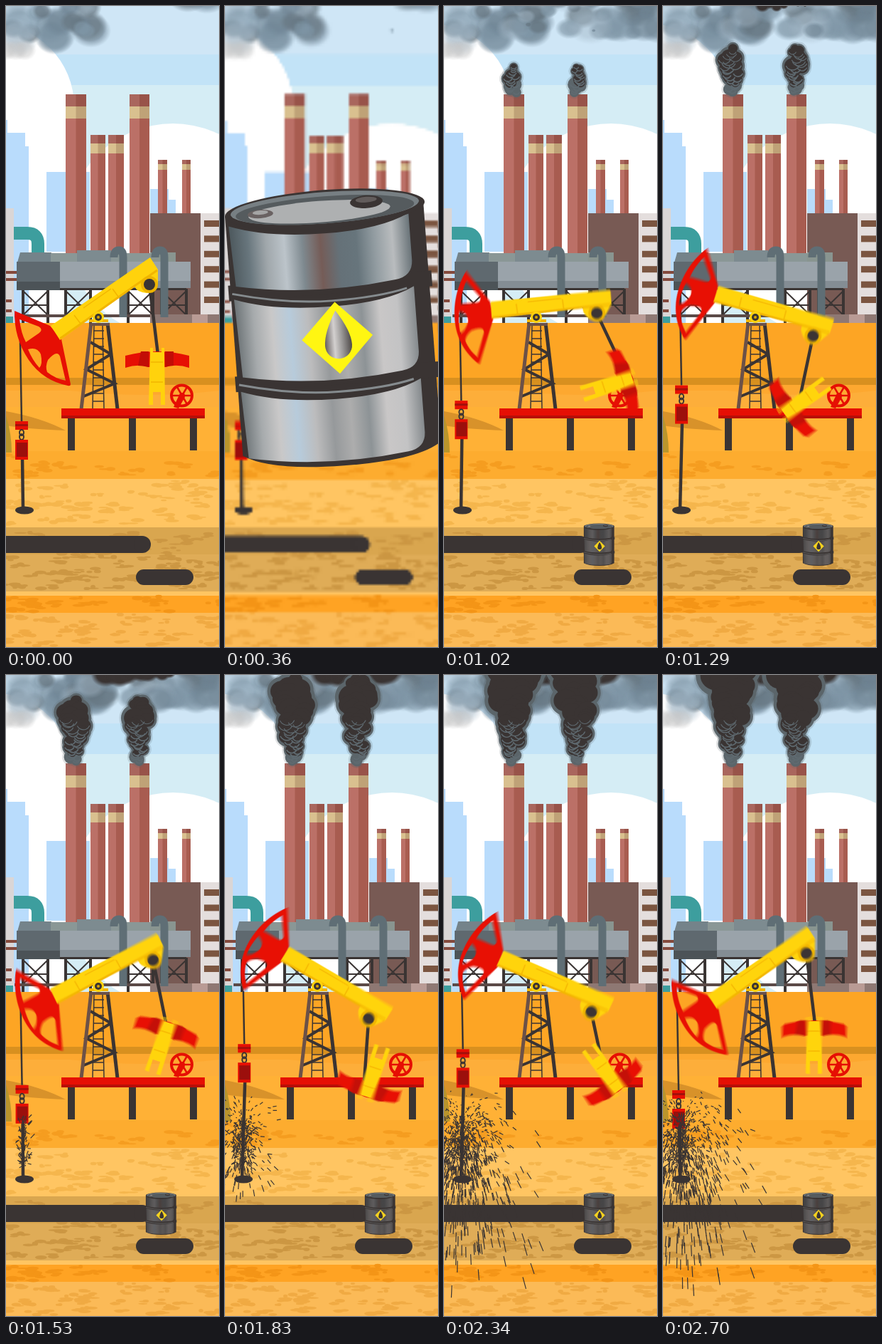
An HTML page with a canvas that plays this animation: 300 by 900 pixels, repeating every 2730 ms.

```html
<!DOCTYPE html>
<html lang="en">
<head>
<meta charset="utf-8">
<title>Oil field</title>
<style>
html, body { margin: 0; width: 100%; height: 100%; overflow: hidden; }
canvas { display: block; }
</style>
</head>
<body>
<canvas id="stage" width="300" height="900"></canvas>
<script>
const W = 300, H = 900, LOOP = 2730, STEP = 30, START = 900;
const DARK = '#3a3433', RED = '#e60f04', YELLOW = '#ffd20c', TAU = Math.PI * 2;
const context = c => c.getContext('2d', { willReadFrequently: true });
const stage = context(document.getElementById('stage'));
let g = stage;

const clamp = v => Math.max(0, Math.min(1, v));
const mix = (a, b, k) => a + (b - a) * k;
const ease = k => k * k * (3 - 2 * k);
const random = seed => () => {
  seed = seed + 0x6D2B79F5 | 0;
  let n = Math.imul(seed ^ seed >>> 15, 1 | seed);
  n = n + Math.imul(n ^ n >>> 7, 61 | n) ^ n;
  return ((n ^ n >>> 14) >>> 0) / 4294967296;
};

function rect(color, x, y, w, h) { g.fillStyle = color; g.fillRect(x, y, w, h); }
function shape(color, d, rule = 'nonzero') { g.fillStyle = color; g.fill(new Path2D(d), rule); }
function line(color, width, d) { g.strokeStyle = color; g.lineWidth = width; g.stroke(new Path2D(d)); }
function oval(color, x, y, rx, ry = rx) {
  g.fillStyle = color;
  g.beginPath();
  g.ellipse(x, y, rx, ry, 0, 0, TAU);
  g.fill();
}
function layer(w, h, draw) {
  const c = document.createElement('canvas');
  c.width = w; c.height = h;
  const previous = g;
  g = context(c);
  if (draw) draw();
  g = previous;
  return c;
}

function chimney(x, y, w, bottom, bandY, bandH) {
  rect('#bb7067', x, y, w, bottom - y);
  rect('#a85c50', x + w / 2, y, w / 2, bottom - y);
  rect('#d9c08f', x, bandY, w, bandH);
  rect('#bfa277', x + w / 2, bandY, w / 2, bandH);
  rect('#00000018', x, y, w, bandY - y);
}

function sky() {
  rect('#cfe6f6', 0, 0, W, 68);
  rect('#c2e3f7', 0, 68, W, 43);
  rect('#d5edf5', 0, 111, W, 340);
  oval('#fff', -20, 141, 116);
  rect('#fff', 0, 140, 84, 310);
  oval('#fff', 235, 315, 150);
  shape('#b9dcfc', 'M0 160V445H32V197H27V178H2V160ZM57 233H118V345H57ZM203 257H229V272H239V345H203Z');
}

function factory() {
  chimney(214, 216, 13, 292, 222, 8);
  chimney(248, 216, 12, 292, 222, 8);
  rect('#785a54', 203, 291, 71, 154);
  rect('#e4dedd', 274, 291, 26, 142);
  for (let y = 301; y < 420; y += 21.4) rect('#7b5540', 279, y, 21, 9);
  rect('#dad6d6', 0, 284, 11, 161);
  for (const y of [372, 382, 412, 426]) rect('#84493c', 0, y, y < 400 ? 16 : 8, 4);
  line('#3d9e9e', 18, 'M11 319H30Q45 319 45 334V347');
  rect('#3d9e9e', 0, 436, 10, 9);
  chimney(84, 124, 29, 347, 141, 17);
  chimney(119, 181, 21, 347, 193, 14);
  chimney(144, 181, 22, 347, 193, 14);
  chimney(174, 124, 28, 347, 141, 17);
  for (const x of [24, 84, 172, 219]) {
    line(DARK, 4, `M${x} 397V445M${x + 35} 397V445`);
    line(DARK, 2, `M${x} 400L${x + 35} 434M${x + 35} 400L${x} 434M${x} 420H${x + 35}`);
  }
  rect('#5b4a47', 12, 433, 191, 4);
  rect('#8e7873', 203, 433, 97, 12);
  rect('#b99b95', 262, 433, 22, 12);
  shape('#74838a', 'M20 346H64V360H16Z');
  rect('#8a9796', 63, 347, 142, 12);
  rect('#7d8b90', 100, 343, 48, 16);
  rect('#899590', 203, 346, 36, 13);
  rect('#5f696f', 15, 359, 62, 28);
  rect('#9aa3aa', 76, 359, 184, 37);
  rect('#848d94', 76, 386, 184, 10);
  rect('#4c5357', 15, 387, 61, 12);
  rect(DARK, 76, 396, 178, 3);
  line('#5f6e75', 11, 'M152 353Q152 343 159 343Q165 343 165 353V437M210 353Q210 343 217 343Q223 343 223 353V437');
}

function ground() {
  const bands = [[445, '#fda524'], [522, '#d8901f'], [532, '#fda830'], [563, '#ffb136'], [625, '#fdac2f'],
    [664, '#ffc562'], [732, '#d9a64f'], [770, '#dfac57'], [822, '#ffc562'], [828, '#ffa323'], [852, '#fbba57']];
  for (const [y, color] of bands) rect(color, 0, y, W, H - y);
  shape('#fdae3a', 'M0 540H90Q200 552 300 540V563H0Z');
  shape('#d8922a', 'M0 569Q50 578 84 596Q30 594 0 589Z');
  const rnd = random(7);
  const soils = [[630, 32, '#f59d20', 18], [668, 60, '#f5b64d', 55], [738, 80, '#cc9743', 80],
    [830, 20, '#f49517', 22], [856, 44, '#f0aa43', 45]];
  for (const [top, height, color, count] of soils)
    for (let i = 0; i < count; i++) {
      const x = rnd() * W, y = top + rnd() * height;
      for (let j = 0; j < 3; j++)
        oval(color, x + (rnd() - .5) * 20, Math.min(y + (rnd() - .5) * 6, top + height), 3 + rnd() * 7, 1 + rnd() * 2);
    }
  shape('#b9952c', 'M0 575Q8 600 8 627H0Z');
  line(DARK, 24, 'M0 756H192');
  oval(DARK, 192, 756, 12);
  shape(DARK, 'M194 791H253A11 11 0 0 1 253 813H194A11 11 0 0 1 194 791Z');
}

function rig() {
  line(DARK, 1.5, 'M124 446L122 566M136 446L138 566');
  for (let y = 456; y < 566; y += 11) line(DARK, 1.5, `M123 ${y}H138`);
  line(DARK, 4, 'M119 472L148 489M146 490L113 510L153 530L107 549');
  line('#6c5147', 5, 'M120 445L106 566');
  line(DARK, 5, 'M143 445L157 566');
  rect('#6c5147', 117, 445, 29, 4);
  for (const x of [87, 173, 259]) rect(DARK, x, 578, 10, 46);
  rect(RED, 78, 565, 202, 14);
  rect('#b80e08', 78, 575, 202, 4);
  line(RED, 4, 'M262 547A14.5 14.5 0 1 1 233 547A14.5 14.5 0 1 1 262 547');
  line(RED, 2.5, 'M234 547H262M241 535L255 559M255 535L241 559');
  shape(RED, 'M236 563L244 546L252 549L243 565Z');
  oval(RED, 248, 547, 4);
}

const backdrop = layer(W, H, () => { sky(); factory(); ground(); rig(); });

// A rotating part on a square canvas centred on its pivot.
const SIZE = 280;
const part = (x, y, draw) => ({ x, y, image: layer(SIZE, SIZE, () => {
  g.translate(SIZE / 2 - x, SIZE / 2 - y);
  draw();
}) });

const beam = part(130, 437, () => {
  shape(RED, 'M12 428L62 449L78 468L91 531Q91 534 87 533Q52 526 32 497Q11 466 12 428Z' +
    'M19 440L46 450Q54 455 44 461L28 472Q21 459 19 440Z' +
    'M31 482Q44 478 49 489Q52 503 47 508Q37 497 31 482Z' +
    'M59 497Q72 482 76 492L84 526Q69 523 58 514Q55 506 59 497Z', 'evenodd');
  shape(YELLOW, 'M63 449L203 353L214 370L214 390Q210 402 198 403Q185 402 181 394L76 469Z');
  line('#f2b500', 3, 'M76 467L181 393L213 371');
  line('#f2b500', 1.5, 'M96 434L105 446M150 397L158 408M109 424L148 397');
  oval('#eeb400', 202, 391, 12);
  oval(DARK, 202, 391, 8);
});

const crank = part(214, 540, () => {
  shape(RED, 'M168 491Q213 479 258 491V508Q241 502 224 507H201Q186 502 168 508Z');
  shape('#c20d06', 'M190 485H201V507Q192 505 186 505ZM224 485H236V505Q230 505 224 507Z');
  shape(YELLOW, 'M203 480H207V486H219V480H223L224 560H218V542H207V560H201Z');
  line('#f2b500', 1.5, 'M204 500H221M204 528H221');
});

const smear = context(layer(SIZE, SIZE));

// Averages several rotated copies so fast parts look motion-blurred.
function spin({ x, y, image }, degrees, spread) {
  const copies = spread ? 4 : 1, half = SIZE / 2;
  smear.setTransform(1, 0, 0, 1, 0, 0);
  smear.clearRect(0, 0, SIZE, SIZE);
  smear.globalCompositeOperation = 'lighter';
  smear.globalAlpha = 1 / copies;
  for (let i = 0; i < copies; i++) {
    smear.setTransform(1, 0, 0, 1, half, half);
    smear.rotate((degrees + spread * ((i + .5) / copies - .5)) * Math.PI / 180);
    smear.drawImage(image, -half, -half);
  }
  g.drawImage(smear.canvas, x - half, y - half);
}

function pump(t) {
  const running = t > START;
  const turn = running ? (t - START) * .6 % 360 : 0;
  const lift = 72 * (1 - Math.abs(1 - turn / 180));

  const x = 22 + lift * .08, y = 583 - lift;
  line(DARK, 2.5, `M${20 + lift * .09} ${470 - lift * .4}L${x} ${y}`);
  line(DARK, 4.5, `M${x + 1} ${y + 50}L24 706`);
  oval(DARK, 26, 708, 13, 5.5);
  rect(RED, x - 9, y, 18, 12);
  rect('#a30f0b', x - 9, y + 4, 18, 3);
  for (const dy of [16, 22]) {
    g.beginPath();
    g.ellipse(x, y + dy, 3, 4, 0, 0, TAU);
    g.lineWidth = 2;
    g.stroke();
  }
  rect(RED, x - 9, y + 26, 18, 28);
  rect('#9c0f0c', x - 7, y + 30, 15, 20);

  const pivot = (lift - 32.6) * Math.PI / 180;
  const bx = 130 + 85.4 * Math.cos(pivot), by = 437 + 85.4 * Math.sin(pivot);
  const swing = [7, 30, 0, -20, 7], q = Math.floor(turn / 90);
  const rod = mix(swing[q], swing[q + 1], turn / 90 - q) * Math.PI / 180;
  line(DARK, 4.5, `M${bx} ${by}L${bx + 101 * Math.sin(rod)} ${by + 101 * Math.cos(rod)}`);
  spin(beam, lift, running ? 3.6 : 0);
  rect('#f2b500', 117, 440, 27, 4);
  oval(YELLOW, 130, 437, 8);
  oval(DARK, 130, 437, 5);
  oval('#d9a400', 130, 437, 2);
  spin(crank, turn, running ? 9 : 0);
}

const softDot = color => layer(48, 48, () => {
  const fade = g.createRadialGradient(24, 24, 0, 24, 24, 24);
  fade.addColorStop(.6, color);
  fade.addColorStop(1, color.slice(0, 7) + '00');
  rect(fade, 0, 0, 48, 48);
});
const tones = ['#a3b7c677', '#8097a7aa', '#6f8494aa', '#65747eaa'].map(softDot);
const soot = softDot(DARK + 'ff'), mist = softDot('#c4c4c477');

function puff(dot, x, y, rx, ry) {
  rx *= 1.2; ry *= 1.2;
  g.drawImage(dot, x - rx, y - ry, rx * 2, ry * 2);
}

function haze(t) {
  const rnd = random(23);
  for (let i = 0; i < 75; i++) {
    const early = i < 26, corner = i > 70;
    const x = early ? 8 + rnd() * 118 : corner ? 255 + rnd() * 50 : 90 + rnd() * 215;
    const y = corner ? -12 : -10 + rnd() * (early ? 58 : 50);
    const size = 11 + rnd() * 14;
    const delay = early || corner ? -700 : 250 + rnd() * 800;
    const k = clamp((t - delay) / 600);
    if (k) puff(tones[i % 4], x + t * .004, y, size * k * (early ? 1 : 1.15), size * k * .85);
  }
  for (let i = 0; i < 10; i++) {
    const k = clamp((t - 1050 - i * 30) / 450), y = -6 + rnd() * 12;
    if (k) puff(soot, 140 + i * 10, y, 17 * k, 14 * k);
  }
  for (const x of [0, 14, 26]) puff(mist, x, 62, 14, 12);
}

function plume(x, t, seed) {
  const rnd = random(seed), puffs = [];
  for (let k = 0; k < 75; k++) {
    const age = (t - 650 - k * 28) / 1000;
    const r = (7 + 14 * age) * Math.min(1, .5 + k * .07) * (.75 + rnd() * .45);
    const px = x + (rnd() - .5) * (10 + 28 * age) * Math.min(1, .2 + k * .12);
    if (age > 0 && age < 1.6) puffs.push({ x: px, y: 122 - 98 * age, r, age });
  }
  for (const p of puffs) oval('#5b656a30', p.x, p.y, p.r + 2.5);
  for (const p of puffs) oval('#5b656a', p.x, p.y, p.r);
  for (const p of puffs) if (p.age > .12) oval(DARK, p.x, p.y, p.r * .78, p.r * .72);
  g.strokeStyle = '#5f6a70';
  for (const p of puffs) {
    if (p.age > .6) continue;
    g.lineWidth = 2.2 - p.age * 2;
    g.beginPath();
    g.arc(p.x, p.y - p.r * .3, p.r * .7, .4, 2.7);
    g.stroke();
  }
}

function spray(t) {
  const rnd = random(91);
  g.strokeStyle = DARK;
  g.lineWidth = 1.2;
  g.beginPath();
  for (let i = 0; i < 1900; i++) {
    const age = (t - 1390 - i * .7) / 1000;
    if (age < 0) break;
    const vx = (rnd() + rnd() + rnd() - 1.5) * 108;
    const vy = -190 + rnd() * 250, y0 = 628 + rnd() * 62;
    if (age > .92) continue;
    const past = Math.max(0, age - .045);
    g.moveTo(25 + vx * past, y0 + vy * past + 185 * past * past);
    g.lineTo(25 + vx * age, y0 + vy * age + 185 * age * age);
    if (i % 25 === 0) { g.stroke(); g.beginPath(); }
  }
  g.stroke();
}

function steel(colors) {
  const fill = g.createLinearGradient(-134, 0, 120, 0);
  colors.forEach((c, i) => fill.addColorStop(i / (colors.length - 1), c));
  return fill;
}

// small: 0 for the bright close-up, 1 for the dark barrel in the pit
function barrel(x, y, scale, degrees, small) {
  g.save();
  g.translate(x, y);
  g.rotate(degrees * Math.PI / 180);
  g.scale(scale, scale);
  shape(DARK, 'M-138 -165V172Q-100 196 3 196Q110 196 142 172V-165Z');
  for (const r of [-60, 68]) shape(DARK, `M-141 ${r - 8}H146V${r + 14}H-141Z`);
  const bright = steel(['#6d7477', '#a6aaac', '#c9c8c8', '#b7cbdb', '#bcbcbd', '#96999b', '#adadad', '#8d9396', '#c9c7c7', '#c3c3c4', '#858a8d']);
  const upper = steel(['#4d585d', '#68767d', '#a0a7ab', '#bcc4ca', '#7e898f', '#755c57', '#657178', '#67757c', '#929ca1', '#b9bcbe', '#6a7479']);
  g.globalAlpha = 1 - small * .72;
  for (const [top, bottom, fill] of [[-151, -66, upper], [-48, 62, bright], [82, 176, bright]])
    shape(fill, `M-134 ${top}Q-80 ${top + 20} 0 ${top + 20}Q80 ${top + 20} 120 ${top}V${bottom - 18}Q119 ${bottom + 4} 95 ${bottom + 7}Q-20 ${bottom + 22} -130 ${bottom}Z`);
  g.globalAlpha = 1;
  for (const r of [-60, 68]) line('#858b8e', 3, `M-136 ${r + 4}Q-60 ${r + 24} 3 ${r + 24}Q70 ${r + 24} 110 ${r + 14}`);
  oval(DARK, 3, -165, 141, 27);
  oval('#777f83', 3, -167, 133, 22);
  oval('#555b5e', 3, -164, 126, 19);
  oval(small > .5 ? '#555b5e' : '#aeb0b1', -5, -162, 100, 15);
  oval('#6a6262', -88, -165, 18, 6);
  oval('#a5a5a5', -88, -167, 11, 3);
  oval(DARK, 62, -171, 23, 9);
  oval('#625c5b', 62, -174, 15, 4);
  shape(small > .5 ? '#f5d21f' : '#fff612', 'M7 -34L57 16L7 67L-43 16Z');
  const drop = g.createLinearGradient(-12, 0, 30, 0);
  drop.addColorStop(0, '#5d5655');
  drop.addColorStop(.35, '#d3d0cf');
  drop.addColorStop(.6, '#9b9998');
  drop.addColorStop(1, '#3c3736');
  shape(small > .5 ? DARK : drop, 'M7 -22Q27 8 27 27A19 19 0 0 1 -11 27Q-11 8 7 -22Z');
  g.restore();
}

const shrunk = context(layer(W, H));

// Shrinking and enlarging the picture is a cheap blur.
function soften(factor) {
  const w = Math.round(W / factor), h = Math.round(H / factor);
  shrunk.drawImage(stage.canvas, 0, 0, w, h);
  stage.drawImage(shrunk.canvas, 0, 0, w, h, 0, 0, W, H);
}

function render(t) {
  const enter = ease(clamp((t - 30) / 270));
  const leave = ease(clamp((t - 600) / 300));
  g.drawImage(backdrop, 0, 0);
  haze(t);
  plume(97, t, 5);
  plume(188, t, 12);
  pump(t);
  spray(t);
  const blur = enter * (1 - leave);
  if (blur > .03) soften(1 + 2.5 * blur);
  if (enter > 0)
    barrel(mix(150, 218, leave), mix(450, 756, leave), enter * mix(1, .153, leave), -4.3 * (1 - leave), leave);
}

const origin = performance.now();
let shown = -1;
function tick() {
  const step = Math.floor((performance.now() - origin) % LOOP / STEP);
  if (step !== shown) render(step * STEP);
  shown = step;
  requestAnimationFrame(tick);
}
tick();
</script>
</body>
</html>
```
